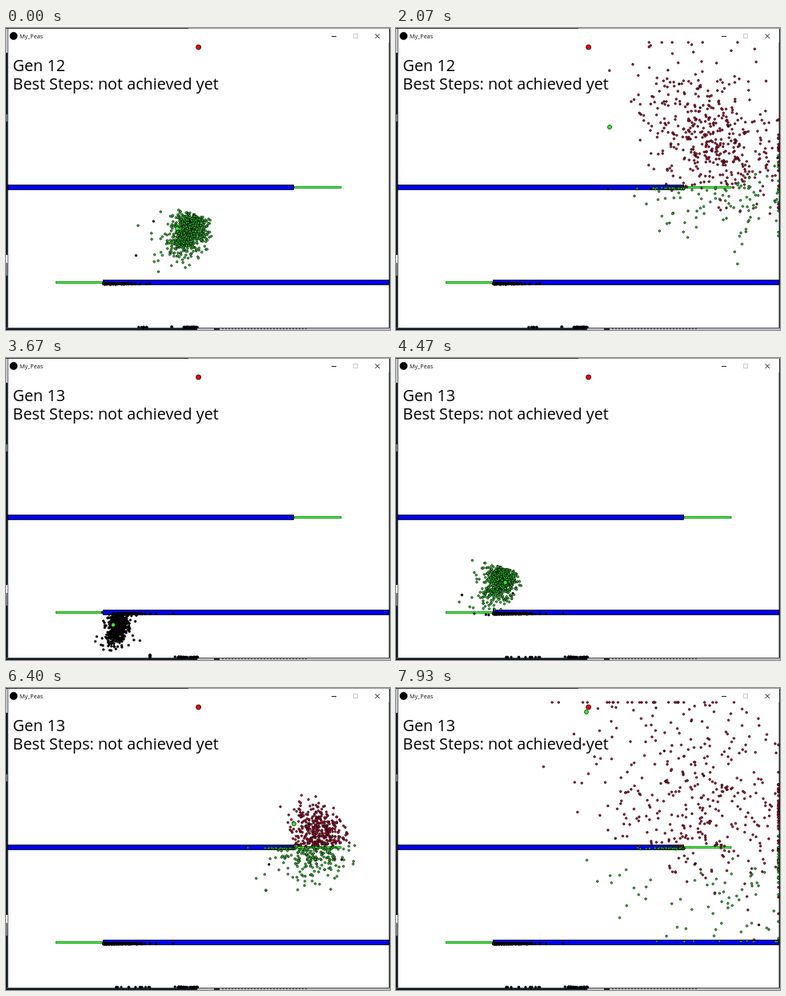
An HTML page with a canvas that plays this animation: 480x378 px, repeating every 8000 ms.

```html
<!DOCTYPE html>
<html>
<head>
<meta charset="utf-8">
<style>
  html, body { margin: 0; width: 100%; height: 100%; overflow: hidden; background: #fff; }
  canvas { display: block; }
</style>
</head>
<body>
<canvas id="stage" width="480" height="378"></canvas>
<script>
const ctx = document.getElementById('stage').getContext('2d');
const STEPS = 120, RESET = 43, FIRST_STEP = 34, LAST_STEP = 76;
const DOTS = 780;
const COLORS = ['#000', '#35e035', '#c8103a'];
const BARRIERS = [
  { y: 318.5, wall: [121.5, 479], gate: [62, 122], level: 1 },
  { y: 199, wall: [2, 360], gate: [360, 419.5], level: 2 }
];

// Swarm keys: step, centre x, centre y, spread x, spread y
const SWARM = [
  [0, 240, 368, 0, 0], [5, 205, 357, 3, 5], [12, 140, 336, 6, 10],
  [16, 106, 326, 8, 11], [19, 100, 306, 9, 12], [23, 122, 281, 11, 14],
  [34, 230, 252, 13, 18], [43, 342, 239, 14, 20], [46, 361, 226, 14, 22],
  [49, 370, 208, 14, 24], [53, 386, 183, 16, 25], [65, 392, 138, 18, 26],
  [76, 378, 146, 20, 28]
];
const LEAD_START = [[0, 240, 368], [5, 203, 356], [12, 134, 334], [17, 104, 318], [22, 116, 288]];
const GENERATIONS = [
  { number: 12, seed: 12, floor: { near: 19, far: [165, 177], farCount: 7 },
    lead: [...LEAD_START, [34, 214, 251], [49, 364, 203], [65, 267, 124], [76, 205, 70]] },
  { number: 13, seed: 77, floor: { near: 26, far: [136, 181], farCount: 13 },
    lead: [...LEAD_START, [35, 250, 243], [49, 366, 203], [53, 360, 170], [76, 238, 30]] }
];

function randomFrom(seed) {
  return () => {
    seed = (seed + 0x6D2B79F5) | 0;
    let t = Math.imul(seed ^ (seed >>> 15), 1 | seed);
    t = (t + Math.imul(t ^ (t >>> 7), 61 | t)) ^ t;
    return ((t ^ (t >>> 14)) >>> 0) / 4294967296;
  };
}

function sample(keys, step) {
  const next = Math.max(1, keys.findIndex(key => key[0] >= step));
  const a = keys[next - 1], b = keys[next];
  const p = (step - a[0]) / (b[0] - a[0]);
  return a.slice(1).map((v, i) => v + (b[i + 1] - v) * p);
}

const centres = Array.from({ length: LAST_STEP + 1 }, (_, step) => sample(SWARM, step));

// Returns the dot's [x, y, level] at every step; it stays put once it hits something.
function flight(rand) {
  const gauss = () => Math.sqrt(-2 * Math.log(1 - rand())) * Math.cos(2 * Math.PI * rand());
  const scale = 0.65 + 1.1 * rand() ** 2;
  const gx = gauss() * scale, gy = gauss() * scale;
  // Dots that drift right also sink
  const wx = gauss() * 3.3, wy = gauss() * 2.9 + wx * 0.45;
  const ignoresGates = rand() < 0.012;
  const track = [];
  let level = 0, dead = false, x = 240, y = 368;
  for (const [step, [cx, cy, sx, sy]] of centres.entries()) {
    if (!dead) {
      const px = x, py = y, loose = 1.5 * Math.max(0, step - 50) ** 0.85;
      x = cx + sx * (gx - 0.35 * gy) + wx * loose;
      y = cy + sy * gy + wy * loose;
      for (const b of BARRIERS) {
        if ((py - b.y) * (y - b.y) > 0) continue;
        const hitX = px + (x - px) * (b.y - py) / (y - py || 1);
        if (hitX >= b.wall[0] && hitX <= b.wall[1]) {
          dead = true;
          x = hitX;
          y = b.y + (py > b.y ? 1 + rand() * 1.5 : -2 + rand());
          break;
        }
        const through = hitX >= b.gate[0] && hitX <= b.gate[1];
        if (through && !ignoresGates && level >= b.level - 1) level = Math.max(level, b.level);
      }
      if (x < 4 || x > 478 || y < 18 || y > 374) {
        dead = true;
        x = Math.min(478, Math.max(4, x));
        y = Math.min(374, Math.max(18, y));
      }
    }
    track.push([x, y, level]);
  }
  return track;
}

function floorCrawl(stop) {
  return centres.map((_, step) => {
    const p = Math.min(1, 5 * step / (240 - stop));
    return [240 + (stop - 240) * p, 368 + 6.5 * p, 0];
  });
}

for (const gen of GENERATIONS) {
  const rand = randomFrom(gen.seed), { near, far, farCount } = gen.floor;
  gen.tracks = Array.from({ length: DOTS }, () => flight(rand));
  for (let i = 0; i < 40; i++) gen.tracks.push(floorCrawl(239.9 - near * rand()));
  for (let i = 0; i < farCount; i++) gen.tracks.push(floorCrawl(far[0] + (far[1] - far[0]) * rand()));
}

function rect(x, y, w, h, fill) {
  ctx.fillStyle = fill;
  ctx.fillRect(x, y, w, h);
}

function outlined(x, y, w, h, fill, stroke = '#000') {
  rect(x, y, w, h, fill);
  ctx.strokeStyle = stroke;
  ctx.lineWidth = 0.9;
  ctx.strokeRect(x, y, w, h);
}

function circle(x, y, r, fill, line = 0.9) {
  ctx.beginPath();
  ctx.arc(x, y, r, 0, 2 * Math.PI);
  ctx.fillStyle = fill;
  ctx.fill();
  ctx.strokeStyle = '#000';
  ctx.lineWidth = line;
  ctx.stroke();
}

function text(value, x, y, font, fill = '#000') {
  ctx.font = font;
  ctx.fillStyle = fill;
  ctx.fillText(value, x, y);
}

function drawWindow() {
  rect(0, 0, 480, 378, '#fff');
  rect(0, 0, 228, 1, '#30343a');
  rect(228, 0, 252, 1, '#999');
  // Desktop showing around the window
  rect(0, 1, 2, 30, '#c4c8cc');
  rect(0, 31, 2, 347, '#0d1824');
  rect(0, 108, 2, 9, '#68727c');
  rect(0, 284, 2, 10, '#eee');
  rect(0, 294, 2, 16, '#717880');
  rect(2, 1, 1, 374, '#777');
  rect(478, 18, 1, 357, '#aaa');
  rect(479, 1, 1, 377, '#17212c');
  rect(0, 375, 480, 1, '#555');
  rect(0, 376, 239, 2, '#101a26');
  rect(239, 376, 241, 2, '#b9bdc2');
  rect(260, 376, 7, 2, '#222');
  for (let x = 270; x < 376; x += 4) rect(x, 376, 2, 1, '#555');

  circle(9.5, 10, 4.7, '#000', 0.5);
  text('My_Peas', 17, 13, '7.2px "Open Sans", sans-serif', '#111');
  rect(407, 10, 6, 1, '#222');
  ctx.lineWidth = 1;
  ctx.strokeStyle = '#ccc';
  ctx.strokeRect(434.5, 7.5, 5, 5);
  ctx.strokeStyle = '#222';
  ctx.beginPath();
  ctx.moveTo(461.5, 7.5); ctx.lineTo(467, 13);
  ctx.moveTo(467, 7.5); ctx.lineTo(461.5, 13);
  ctx.stroke();
}

function draw(step) {
  const [gen, age] = step < RESET
    ? [GENERATIONS[0], step + FIRST_STEP]
    : [GENERATIONS[1], step - RESET];
  drawWindow();
  const font = '19.8px "Open Sans", "Noto Sans", sans-serif';
  text('Gen ' + gen.number, 8.6, 53.5, font);
  text('Best Steps: not achieved yet', 8.6, 77, font);
  circle(240.6, 24, 3, '#f00', 0.8);

  outlined(62.5, 317.5, 59, 2, '#4bff4b', '#168c16');
  outlined(360.5, 198.5, 58.5, 2, '#4bff4b', '#168c16');
  outlined(2.5, 196.5, 357, 5.8, '#00f');
  outlined(121.5, 315.5, 357, 5.8, '#00f');

  for (const track of gen.tracks) {
    const [x, y, level] = track[age];
    circle(x, y, 1.3, COLORS[level], 0.7);
  }
  circle(...sample(gen.lead, age), 2.5, '#32ff32', 0.7);
}

let shown = -1;
function tick(now) {
  // Fifteen steps a second, with a small allowance for rounded times
  const step = Math.floor(now * 0.015 + 0.06) % STEPS;
  if (step !== shown) draw(shown = step);
  requestAnimationFrame(tick);
}
tick(performance.now());
</script>
</body>
</html>
```
